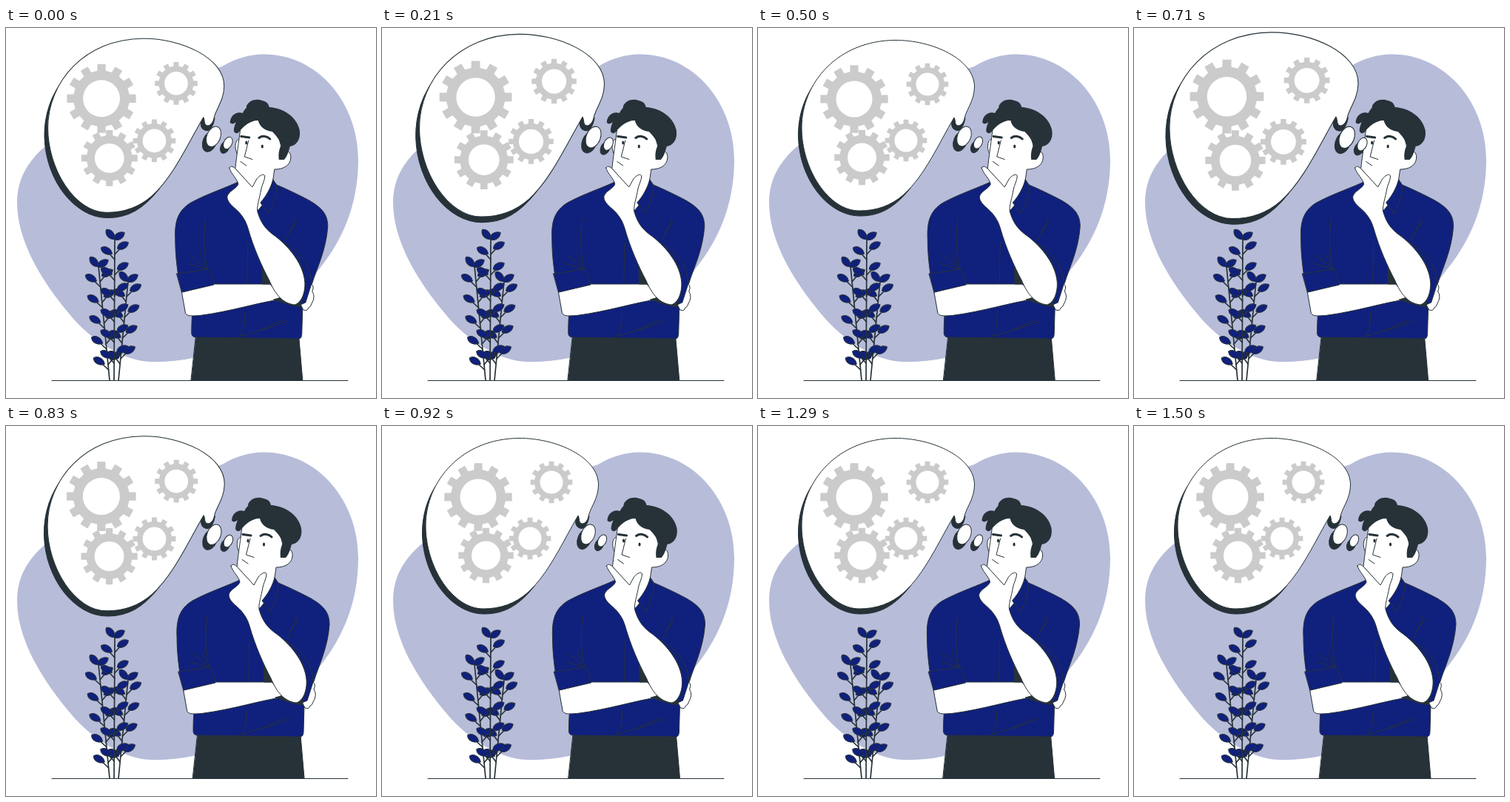
Animation, 500 px wide and 500 px high, one loop 1540 ms. Source, as an HTML page:

```html
<!DOCTYPE html>
<html lang="en">
<head>
<meta charset="utf-8">
<title>Thinking</title>
<style>
  html, body { margin: 0; width: 100%; height: 100%; overflow: hidden; background: #fff; }
  svg { display: block; width: 100vw; height: 100vh; }
  .navy { fill: #10207d; }
  .dark { fill: #263238; }
  .white { fill: #fff; }
  .line { fill: none; }
  .flat { stroke: none; }
  .ink { stroke: #263238; stroke-width: 1; stroke-linecap: round; stroke-linejoin: round; }
  .brow { stroke-width: 3; }
  .stem { stroke-width: 1.7; }
  #bubble { transform-origin: 179px 132px; }
  #bubble, #man { transform: var(--move); }
</style>
</head>
<body>
<svg viewBox="0 0 500 500">
  <path fill="#b7bcd9" d="M348 35.5C420 35 476 100 476 178C476 240 454 288 423 326C385 378 345 425 252 446Q225 452 195 451C160 450 120 425 92 394C45 340 15 285 15 236C15 190 45 160 90 135C180 90 220 75 292 52Q318 36 348 35.5Z"/>
  <g id="plant" class="ink"></g>

  <g id="man" class="ink">
    <path class="dark" d="M257 416L396 418L401 476H250.500Z"/>
    <path class="navy" d="M316 207C300 215 272 224 250 236C232 247 228 262 229 285C229 305 231 320 233 335L238 357L252 385C251 398 251 406 251 412C251 416 253 418 258 418L395 420C399 420 400 417 400 412L401 376L405 370C410 358 411 348 414 345C420 325 433 300 435 268C435 250 425 242 410 233C395 225 378 217 366 212L361 205Z"/>
    <path class="line" d="M270 257C267 275 267 300 271 318M249 307L274 326M262 305L273 325M246 318L272 326M391 257C388 268 382 276 378 287M393 262L381 279M327 290L326 345M323 385C323 400 322 408 316 417M315 417C335 412 355 404 372 395M345 409L380 396"/>

    <path class="white" d="M316 150C308 150 309 167 314 172"/>
    <path class="white" d="M322 118L317 136C315 152 312 172 310 190L333 216L340 247C350 237 358 222 361 205L363 191C375 191 384 186 385 176C386 166 378 164 374 169L362 118Z"/>
    <path class="navy" d="M361 205C364 209 366 214 366 219C364 231 360 242 355 251L344 236C352 227 358 216 361 205Z"/>
    <path class="dark flat" d="M303 128C303 118 312 112 320 115C323 109 326 108 325 106C328 98 338 95 346 98C352 99 355 102 356 107C375 108 393 120 397 138C399 151 392 159 384 160C382 167 380 174 376 178H369C368 170 369 165 372 158C369 150 366 146 360 140C351 139 343 134 341 125C333 124 323 131 317 138C314 143 310 144 308 139C308 134 310 130 311 127C308 130 305 130 303 128Z"/>
    <path class="line brow" d="M318 146.500L329 148M342 148.500C347 145 353 146 357 150"/>
    <g class="dark flat">
      <ellipse cx="325" cy="155" rx="1.600" ry="2.600"/>
      <ellipse cx="346.500" cy="160" rx="1.600" ry="2.600"/>
    </g>
    <path class="line" d="M328 152L322.500 174L333 177.500M317 180.500L325 186"/>

    <path class="white" d="M238 357L281 346H357L375 366C340 371 305 383 262 388.500C252 389 246 390 243 386Z"/>
    <path class="navy" d="M231 332L273 326C276 330 280 340 281 347L238 357Z"/>
    <path class="dark" d="M346 312L358 346H347ZM362 367L372 364L401 371L400 377C388 376 374 371 362 367Z"/>
    <path class="white" d="M405 349L413 346Q417 349 414 356Q419 363 413 373Q412 377 409 378Q408 383 402 381L399 375Z"/>
    <path class="navy" d="M374 289C395 300 412 318 413 346L405 371L398 374C406 355 407 330 392 307Z"/>
    <path class="white" d="M302 189C304 185 308 188 311 191L333 215L339 204C343 199 349 196 350 200C350 206 346 212 345 218C343 230 339 240 340 248C345 265 352 273 365 282C385 298 402 320 404 343C405 358 399 372 390 374C374 372 364 360 356 341C346 322 335 298 327 270C324 260 320 255 316 250C309 242 299 237 299 228C301 220 311 218 314 211C313 204 304 197 302 189Z"/>
  </g>

  <path class="ink" d="M62 476.500H462"/>

  <g id="bubble">
    <g class="ink">
      <path class="dark" d="M84 66C62 90 54 120 54.500 147C56 205 95 254 138 254C165 254 185 243 207 215L150 100ZM265 121C259 128 261 138 270 138.500C276 138 279 128 280 122Z"/>
      <path class="white" d="M185 16.500C235 16 293 42 292.500 80C292 98 283 108 279.500 120C278 130 272 134 268 131C265.500 128 267 124 265 121C245 155 225 200 197 225C180 240 160 247 137 247C95 247 59 190 59 135C59 74 108 17 185 16.500Z"/>
      <ellipse class="dark" cx="273.500" cy="153" rx="9" ry="14" transform="rotate(22 273.500 153)"/>
      <ellipse class="white" cx="278.500" cy="146.500" rx="9" ry="14" transform="rotate(22 278.500 146.500)"/>
      <ellipse class="dark" cx="293.500" cy="160.500" rx="5.500" ry="8.500" transform="rotate(25 293.500 160.500)"/>
      <ellipse class="white" cx="297.500" cy="155" rx="5.500" ry="8.500" transform="rotate(25 297.500 155)"/>
    </g>
    <g id="gears" fill="#cbcbcb" fill-rule="evenodd"></g>
  </g>
</svg>
<script>
const $ = id => document.getElementById(id);

function addPath(parent, attrs) {
  const el = document.createElementNS('http://www.w3.org/2000/svg', 'path');
  for (const name in attrs) el.setAttribute(name, attrs[name]);
  $(parent).append(el);
}

// Twelve tapered teeth around a body with a round hole
function gear(cx, cy, r, hole) {
  const at = (angle, k) => `${cx + Math.cos(angle) * r * k} ${cy + Math.sin(angle) * r * k}`;
  const teeth = Array.from({ length: 12 }, (_, i) => {
    const a = i * Math.PI / 6;
    return [at(a - .15, .81), at(a - .12, 1), at(a + .12, 1), at(a + .15, .81)].join('L');
  });
  const arc = `a${hole} ${hole} 0 1 0 `;
  addPath('gears', { d: `M${teeth.join('L')}ZM${cx - hole} ${cy}${arc}${2 * hole} 0${arc}${-2 * hole} 0Z` });
}

function leaf(x, y, tilt) {
  addPath('plant', {
    class: 'navy',
    d: 'M-8.5 0C-5 -6 4 -6 8.5 0C4 6 -5 6 -8.5 0Z',
    transform: `translate(${x} ${y}) rotate(${tilt})`
  });
}

// A straight stem with a pair of leaves on top and alternating leaves below
function stem(foot, tipX, tipY) {
  const ground = 476, gap = 28;
  const xAt = y => foot + (tipX - foot) * (ground - y) / (ground - tipY);
  const twig = (x, y, tilt) => {
    const base = y + 12;
    addPath('plant', { class: 'line stem', d: `M${x} ${y}L${xAt(base)} ${base}` });
    leaf(x, y, tilt);
  };
  addPath('plant', { class: 'line stem', d: `M${foot} ${ground}L${tipX} ${tipY}` });
  leaf(tipX - 6, tipY - 6, 50);
  leaf(tipX + 6, tipY - 4, -32);
  for (let y = tipY + 9; y < 450; y += gap) {
    twig(xAt(y) + 11, y, -28);
    twig(xAt(y) - 11, y + 7, 28);
  }
}

gear(130, 96, 46, 24.5);
gear(140.5, 175, 37.5, 19.5);
gear(200, 152, 28.5, 15.5);
gear(229, 76, 28.5, 15.5);
stem(140, 125, 322);
stem(152, 165, 342);
stem(146, 147, 285);

// Two beats per cycle, p in percent: the first fades slowly, the second is even
const beat = p => 1 + .1 * Math.max(0, Math.min(p / 10, (30 - p) / 20), 1 - Math.abs(p - 50) / 10);

// A sideways shake whose second half mirrors the first
const swings = [0, -1, 2, -4, 4, -4];
function shake(p) {
  const q = Math.min(p, 100 - p) / 10, i = Math.min(4, Math.floor(q));
  return swings[i] + (swings[i + 1] - swings[i]) * (q - i);
}

// Held pictures, 24 per second; a custom property keeps the scaled lines sharp
const LOOP = 1540, PERIOD = 1500, LEAD = 30, COUNT = 37;
function play(id, move) {
  const steps = Array.from({ length: COUNT }, (_, i) => {
    const t = i * 1000 / 24;
    return {
      offset: Math.round(t / 10) * 10 / LOOP,
      '--move': move(Math.min(100, (t + LEAD) / PERIOD * 100)),
      easing: 'steps(1, end)'
    };
  });
  steps.push({ ...steps[COUNT - 1], offset: 1 });
  $(id).animate(steps, { duration: LOOP, iterations: Infinity });
}
play('bubble', p => `scale(${beat(p)})`);
play('man', p => `translateX(${shake(p)}px)`);
</script>
</body>
</html>
```
